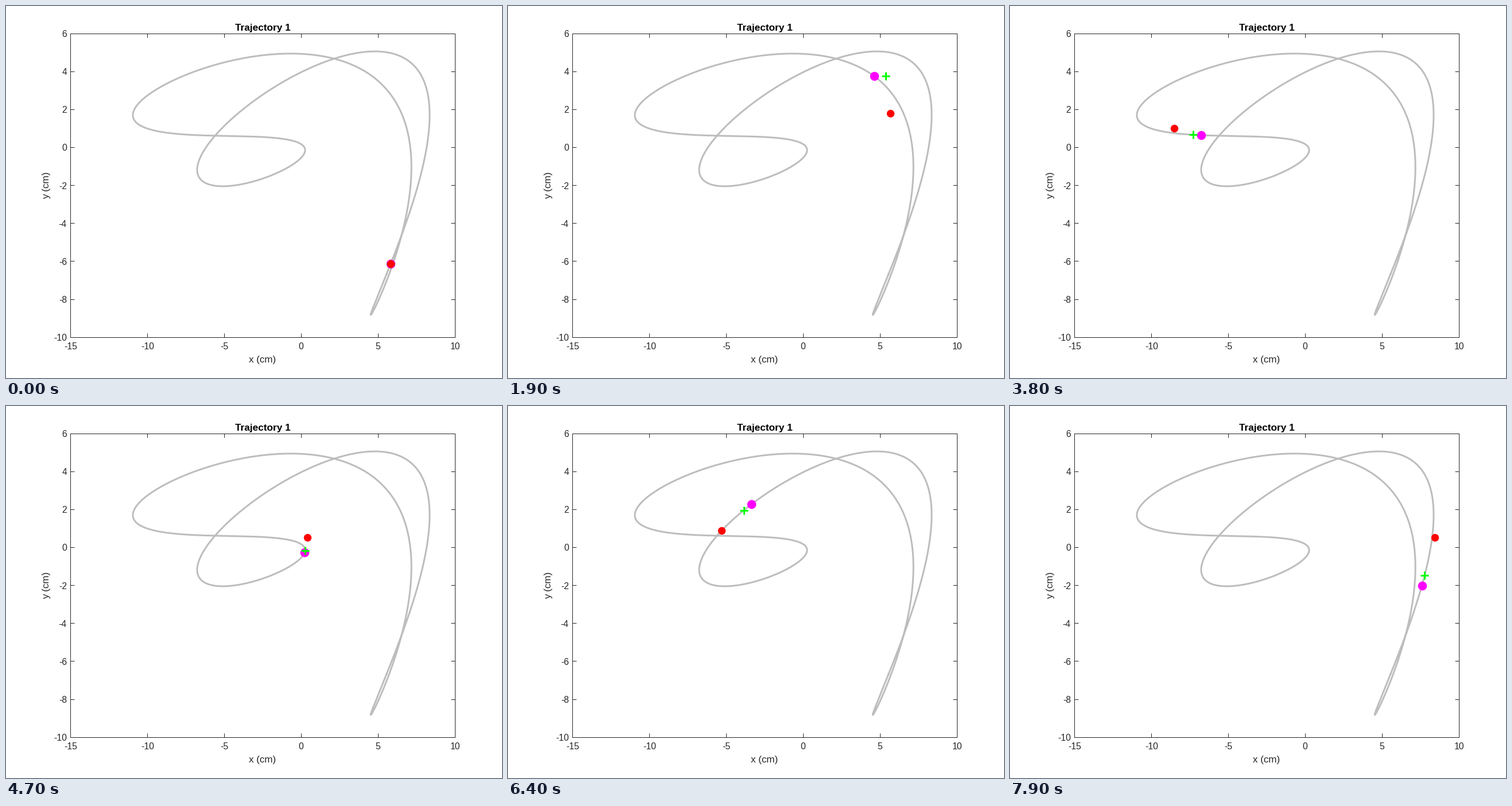
A matplotlib script for the animation above (8000 ms loop, 864 px wide and 648 px high).

```python
import numpy as np
import matplotlib.pyplot as plt
from matplotlib.animation import FuncAnimation

W, H, DPI = 864, 648, 72
FRAMES, STEP = 80, 100          # frames, ms per frame
HARMONICS = 3
LEFT, RIGHT, TOP, BOTTOM = 112.3, 782.1, 48.6, 577.1
INK, PATH = "#262626", "#bdbdbd"
TICK_SIZE, LABEL_SIZE = 15.8, 17

plt.rcParams["font.family"] = "Liberation Sans"

# Extremes, crossings and a few more points of the path: rough second, x, y.
KEYS = np.array([
    (0, 662, 467), (.42, 640, 526), (1.09, 689, 399), (1.4, 706, 280),
    (1.9, 637, 121), (2.1, 571, 92), (2.29, 494, 83), (2.7, 320.5, 117),
    (3.2, 221, 189), (3.8, 334.5, 225), (3.89, 364, 226), (4.65, 521, 250),
    (5.47, 378, 314), (5.7, 341, 304), (5.86, 333, 286), (6.17, 364, 226),
    (6.8, 571, 92), (7.01, 643, 79), (7.1, 670, 82), (7.6, 738, 189),
    (7.9, 718, 312), (8.13, 689, 399),
])


def basis(angle):
    """Constant, cosines and sines, and their derivatives."""
    k = np.arange(1, HARMONICS + 1)
    a = np.atleast_1d(angle)[:, None] * k
    one = np.ones((len(a), 1))
    value = np.hstack([one, np.cos(a), np.sin(a)])
    slope = np.hstack([0 * one, -k * np.sin(a), k * np.cos(a)])
    return value, slope


def fit_path(seconds, points, period=8.34):
    """Fit the sum of sinusoids, sliding each point along the path."""
    angle = 2 * np.pi * seconds / period
    for _ in range(500):
        value, slope = basis(angle)
        coef = np.linalg.lstsq(value, points, rcond=None)[0]
        miss, tangent = points - value @ coef, slope @ coef
        angle = angle + (miss * tangent).sum(1) / ((tangent ** 2).sum(1) + 2500)
    return coef, np.polyfit(seconds, angle, 1)


coef, clock = fit_path(KEYS[:, 0], KEYS[:, 1:])


def target(t):
    return (basis(np.polyval(clock, t))[0] @ coef)[0]


def follower(lag, error):
    """Delayed target plus a drifting error; starts exactly on the target."""
    keys = np.array([(0, *(target(0) - target(-lag))), *error])

    def position(t):
        return target(t - lag) + [np.interp(t, keys[:, 0], keys[:, i]) for i in (1, 2)]

    return position


fig = plt.figure(figsize=(W / DPI, H / DPI), dpi=DPI, facecolor="white")
ax = fig.add_axes([0, 0, 1, 1])
ax.set_xlim(0, W)
ax.set_ylim(H, 0)
ax.axis("off")


def stroke(xs, ys):
    """One-pixel line on pixel centres."""
    ax.plot(np.floor(xs) + .5, np.floor(ys) + .5, color=INK, lw=1, snap=False,
            solid_capstyle="butt", solid_joinstyle="miter", zorder=1)


def label(x, y, s, size=LABEL_SIZE, ha="center", color=INK, **kw):
    ax.text(x, y, s, fontsize=size, ha=ha, va="baseline", color=color, **kw)


stroke([LEFT, RIGHT, RIGHT, LEFT, LEFT], [TOP, TOP, BOTTOM, BOTTOM, TOP])
TICK = 6.7
for v in range(-15, 11, 5):
    x = LEFT + (v + 15) / 25 * (RIGHT - LEFT)
    stroke([x, x], [BOTTOM, BOTTOM - TICK])
    stroke([x, x], [TOP, TOP + TICK])
    label(x, 598.5, str(v), TICK_SIZE)
for v in range(-10, 7, 2):
    y = BOTTOM - (v + 10) / 16 * (BOTTOM - TOP)
    stroke([LEFT, LEFT + TICK], [y, y])
    stroke([RIGHT, RIGHT - TICK], [y, y])
    label(106, y + 5.7, str(v), TICK_SIZE, ha="right")

label(447, 42.5, "Trajectory 1", 17.2, weight="bold", color="black")
label(447, 620.5, "x (cm)")
label(75.5, 312, "y (cm)", rotation=90, rotation_mode="anchor")

lap = basis(np.linspace(0, 2 * np.pi, 1500))[0] @ coef
ax.plot(lap[:, 0], lap[:, 1], color=PATH, lw=3, solid_joinstyle="round", zorder=2)


def marker(shape, color, size, edge, z):
    return ax.scatter([0], [0], s=size ** 2, marker=shape, color=color,
                      linewidths=edge, zorder=z)


red = follower(0.2, [
    (.2, -4, 10), (.9, -3, 6), (1.9, -17, 12), (2.7, -7, -5), (3.3, -15, -3),
    (3.8, 12, -7), (5.7, 10, -16), (6.3, 2, -3), (7.9, 5, -1),
])
green = follower(0.042, [(.9, 13, -12), (1.9, 9, -10), (2.5, 0, 0)])

movers = [
    (marker("o", "#ff00ff", 15.6, 0, 3), target),
    (marker("+", "#00ff00", 14, 3, 4), green),
    (marker("o", "#ff0000", 13.4, 0, 5), red),
]


def draw(frame):
    t = frame * STEP / 1000
    for dot, position in movers:
        dot.set_offsets([position(t)])
    return [dot for dot, _ in movers]


anim = FuncAnimation(fig, draw, frames=FRAMES, interval=STEP,
                     repeat=True, repeat_delay=0, blit=False)
plt.show()
```
